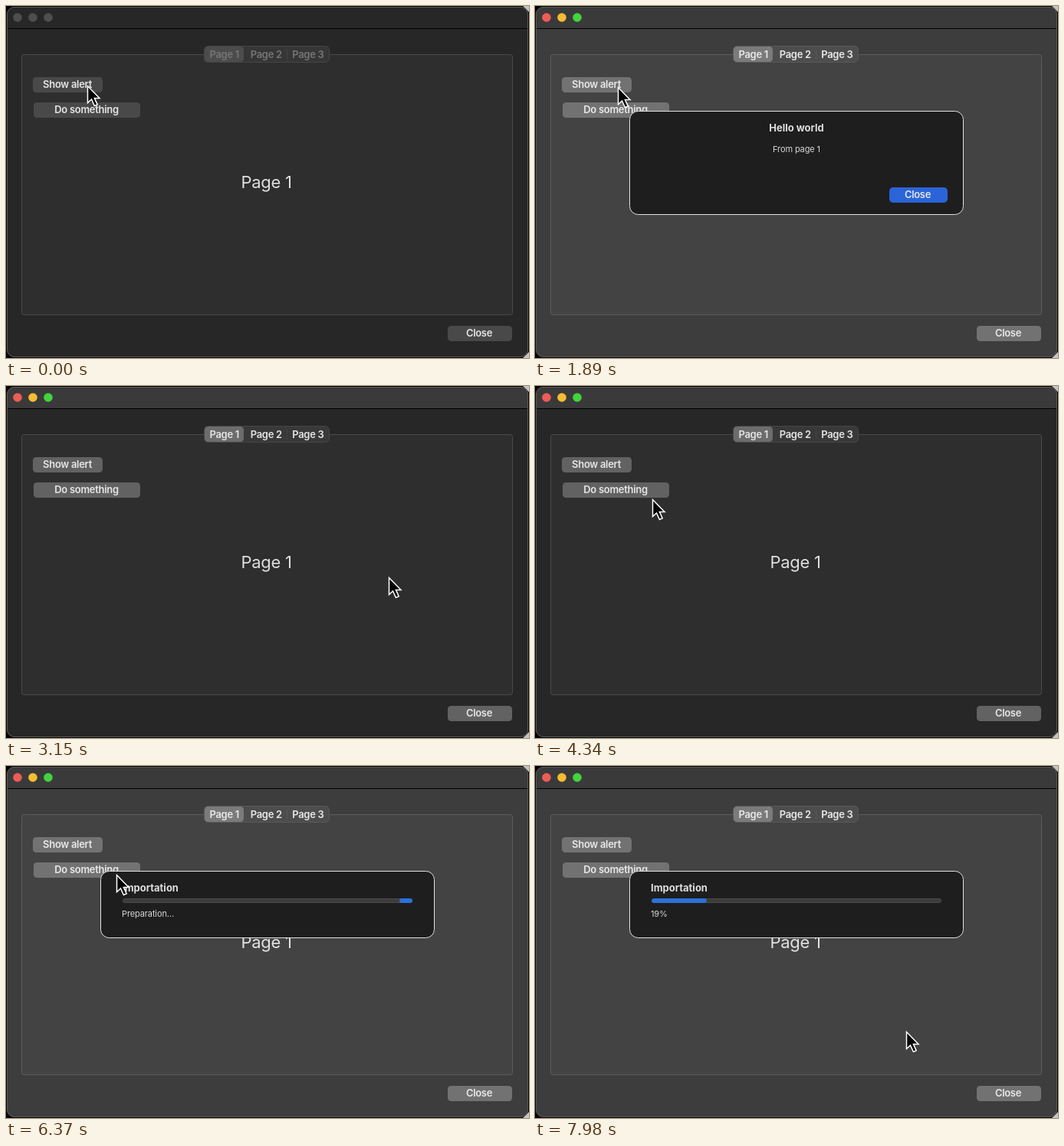
Animation of 682 by 460 pixels, one loop 8 s. Source, as an HTML page:

```html
<!DOCTYPE html>
<html lang="en">
<head>
<meta charset="utf-8">
<title>Dialog demo</title>
<style>
html, body { margin: 0; width: 100%; height: 100%; overflow: hidden; background: #000; }
svg { display: block; width: 682px; height: 460px; }
text { font: 600 13px Inter, "Open Sans", sans-serif; letter-spacing: -.3px; fill: #e6e6e6; }
.mid { text-anchor: middle; }
.bold { font-weight: 700; letter-spacing: 0; fill: #dedede; }
.small { font-size: 11px; font-weight: 400; letter-spacing: -.12px; fill: #d8d8d8; }
.large { font-size: 22px; font-weight: 400; letter-spacing: -.3px; fill: #dfdfdf; }
.sheet { fill: #1e1e1e; stroke: #e2e2e2; }
</style>
</head>
<body>
<svg viewBox="0 0 682 460">
  <defs>
    <clipPath id="track"><rect x="152" y="173" width="378" height="6" rx="3"/></clipPath>
    <clipPath id="frame"><rect x="1" y="1" width="680" height="458" rx="10"/></clipPath>
  </defs>
  <path d="M674 0h8v8zM682 452v8h-8z" fill="#c4c4c4"/>
  <g clip-path="url(#frame)">
    <rect width="682" height="460" fill="#272727"/>
    <rect id="titlebar" width="682" height="29"/>
    <rect y="29" width="682" height="1" fill="#000"/>
    <g id="lights"></g>

    <rect x="20.5" y="63.5" width="640" height="340" rx="3" fill="#2e2e2e" stroke="#4a4a4a"/>
    <rect id="tabs" x="258.5" y="52.5" width="163" height="21" rx="5" stroke="#464646"/>
    <rect id="tab" x="259" y="53" width="51" height="20" rx="4.5"/>
    <path d="M366.5 56v14" stroke="#434343"/>
    <g id="tabTexts"></g>

    <g id="buttons">
      <rect x="35" y="93" width="91" height="20" rx="4.5"/>
      <rect x="36" y="126" width="139" height="20" rx="4.5"/>
      <rect x="576" y="418" width="84" height="20" rx="4.5"/>
    </g>
    <text class="mid" x="80" y="107">Show alert</text>
    <text class="mid" x="105" y="140">Do something</text>
    <text class="mid" x="617" y="432">Close</text>
    <text class="mid large" x="339.5" y="238">Page 1</text>
    <rect id="veil" y="30" width="682" height="430" fill="#fff"/>
  </g>
  <rect x="1.5" y="1.5" width="679" height="457" rx="9.5" fill="none" stroke="#5c5c5c"/>

  <g id="alert">
    <rect class="sheet" x="123.5" y="137.5" width="435" height="135" rx="11"/>
    <text class="mid bold" x="341" y="164">Hello world</text>
    <text class="mid small" x="341" y="191">From page 1</text>
    <rect id="halo" x="459" y="234" width="82" height="26" rx="7" fill="#2b5797"/>
    <rect id="ok" x="462" y="237" width="76" height="20" rx="5"/>
    <text class="mid" x="499" y="251">Close</text>
  </g>

  <g id="import">
    <rect class="sheet" x="123.5" y="137.5" width="435" height="87" rx="11"/>
    <text class="bold" x="151" y="164">Importation</text>
    <rect x="152.5" y="173.5" width="377" height="5" rx="2.5" fill="#3c3c3c" stroke="#4b4b4b"/>
    <g clip-path="url(#track)"><rect id="bar" y="173" height="6" rx="3" fill="#2d70d8"/></g>
    <text class="small" id="status" x="151" y="197"></text>
  </g>

  <path id="cursor" d="M.5 .5V22.6L5.5 17.9L9.4 26.5L13.2 24.9L9.4 16.4H16Z"
        fill="#000" stroke="#fff" stroke-width="1.5"/>
</svg>
<script>
const LOOP = 8000, TICK = 70;
const $ = id => document.getElementById(id);
const ramp = (t, from, to) => Math.max(0, Math.min(1, (t - from) / (to - from)));
const lerp = (a, b, p) => a + (b - a) * p;
const ease = p => p < .5 ? 4 * p ** 3 : 1 - 4 * (1 - p) ** 3;
const blend = (a, b, p) => `color-mix(in srgb, ${b} ${100 * p}%, ${a})`;

function add(parent, tag, attributes, content = '') {
  const el = document.createElementNS('http://www.w3.org/2000/svg', tag);
  for (const name in attributes) el.setAttribute(name, attributes[name]);
  el.textContent = content;
  $(parent).append(el);
  return el;
}

const lightColors = ['#ee5c54', '#f5bd31', '#42d43e'];
const lights = lightColors.map((_, i) => add('lights', 'circle', { cx: 15 + 20 * i, cy: 15, r: 5.8 }));
for (let i = 0; i < 3; i++) {
  add('tabTexts', 'text', { class: 'mid', x: 284.7 + 54.6 * i, y: 68, style: 'fill: inherit' }, `Page ${i + 1}`);
}

const pointerMoves = [
  { from: 1400, to: 1890, x: 108, y: 106 },
  { from: 1890, to: 2590, x: 499, y: 250 },
  { from: 3780, to: 4340, x: 153, y: 148 },
  { from: 4340, to: 4620, x: 144, y: 142 },
  { from: 7210, to: 7490, x: 484, y: 347 }
];

function pointerAt(t) {
  let x = 106, y = 104;
  for (const move of pointerMoves) {
    const p = ease(ramp(t, move.from, move.to));
    x = lerp(x, move.x, p);
    y = lerp(y, move.y, p);
  }
  return `translate(${Math.round(x)} ${Math.round(y)})`;
}

function showSheet(el, open, cy) {
  const s = lerp(.85, 1, open);
  el.setAttribute('opacity', open);
  el.setAttribute('transform', `translate(${341 * (1 - s)} ${cy * (1 - s)}) scale(${s})`);
}

function drawWindow(active, veil) {
  $('titlebar').style.fill = blend('#272727', '#3a3a3a', active);
  lights.forEach((el, i) => el.style.fill = blend('#4e4e4e', lightColors[i], active));
  $('buttons').style.fill = blend('#494949', '#626262', active);
  $('tabs').style.fill = blend('#363636', '#393939', active);
  $('tab').style.fill = blend('#4c4c4c', '#6c6c6c', active);
  $('tabTexts').style.fill = blend('#767676', '#e6e6e6', active);
  $('veil').setAttribute('opacity', .1 * veil);
}

// The bar slides past the right end and back, then fills up by one percent per tick.
function drawProgress(t) {
  const sliding = t < 6720;
  const percent = Math.floor((t - 6650) / TICK);
  $('bar').setAttribute('x', sliding ? 614 - .529 * Math.abs(t - 6179) : 152);
  $('bar').setAttribute('width', sliding ? 127 : 3.78 * percent);
  $('status').textContent = sliding ? 'Preparation…' : percent + '%';
}

function draw(time) {
  const t = Math.floor(time / TICK) * TICK;
  const active = ramp(t, 1190, 1610);
  const alertOpen = t < 3150 ? ramp(t, 210, 420) : 0;
  const importOpen = ramp(t, 4900, 5110);
  const pressed = t >= 3010;

  drawWindow(active, Math.max(alertOpen, importOpen));
  showSheet($('alert'), alertOpen, 205);
  $('halo').setAttribute('opacity', pressed ? 1 : 0);
  $('ok').style.fill = pressed ? '#3882df' : blend('#474747', '#2a64d8', active);
  showSheet($('import'), importOpen, 181);
  drawProgress(t);
  $('cursor').setAttribute('transform', pointerAt(t));
}

const start = performance.now();
function loop() {
  draw((performance.now() - start) % LOOP);
  requestAnimationFrame(loop);
}
loop();
</script>
</body>
</html>
```
